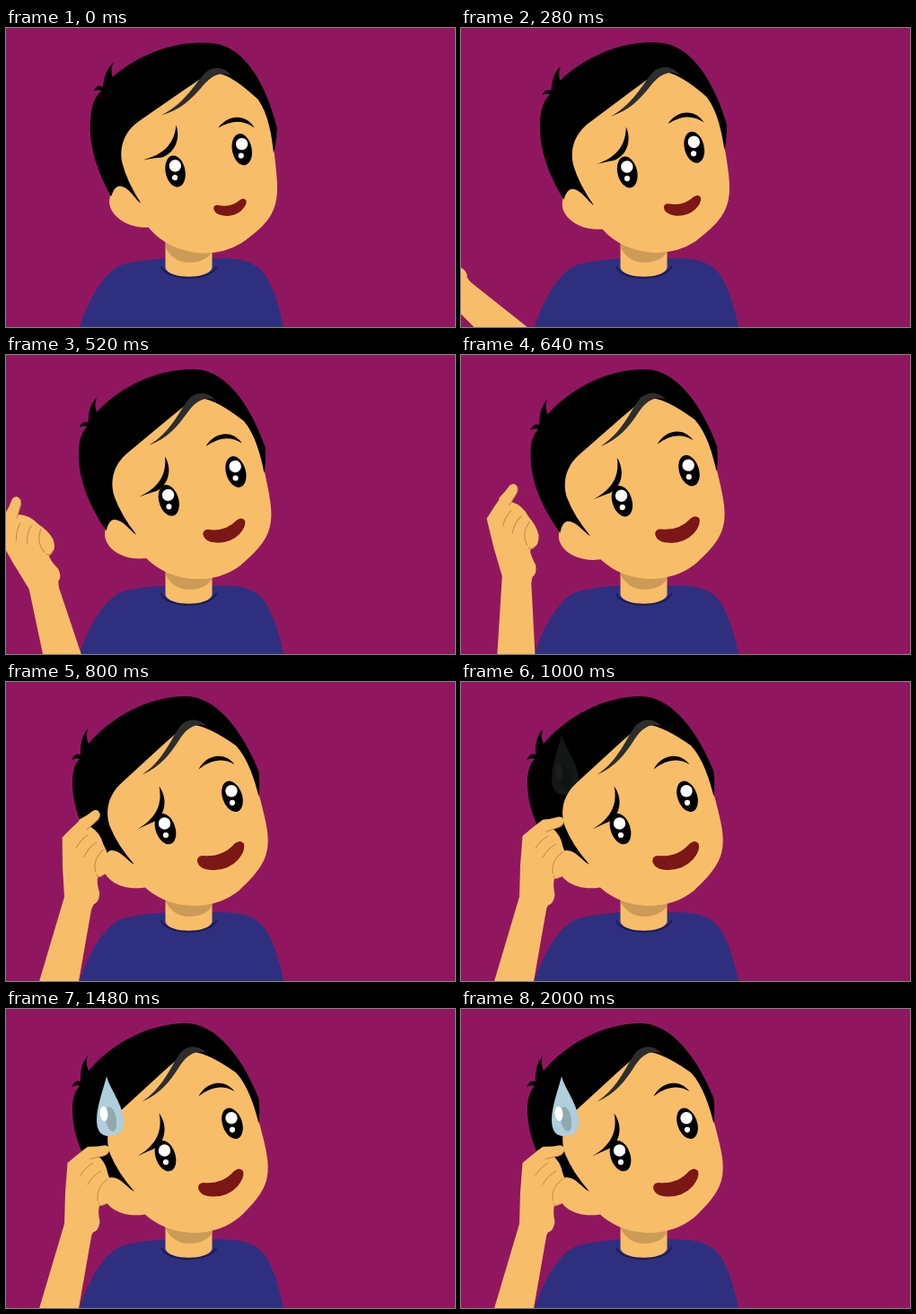
Animation, 500 px wide and 334 px high, one loop 2240 ms. Source, as an HTML page:

```html
<!DOCTYPE html>
<html lang="en">
<head>
<meta charset="utf-8">
<title>Puzzled boy</title>
<style>
  html, body { margin: 0; width: 100%; height: 100%; overflow: hidden; background: #90175f; }
  svg { display: block; width: 100vw; height: 100vh; }
  .skin { fill: #f8bd69; }
  .crease { fill: none; stroke: #b98a48; stroke-width: 1; stroke-linecap: round; }
  .lips { fill: #7b1716; }
</style>
</head>
<body>
<svg viewBox="0 0 500 334">
  <rect width="500" height="334" fill="#90175f"/>

  <!-- torso -->
  <path fill="#2f2f80" d="M82 334C91 304 112 267 133 263.500Q150 259 178 257.500H230C265 256 281 262 292 281Q303 303 309 334Z"/>
  <path fill="none" stroke="#1b1b55" stroke-width="2.200" d="M173 266.500C178 283 229 283 234.500 266"/>
  <path class="skin" d="M177.500 235H229.500V268C226 281 181 281 177.500 268Z"/>
  <path fill="#cc9b57" d="M178 238H229.500V250Q222 262 204 262Q187 262 178 246Z"/>

  <g id="head">
    <path class="skin" d="M281.500 125C288 150 293 168 291.500 182C290 203 276 217 260 232.500Q240 249 212 250C185 250 168 241 155 229.500C128 234 109 220 107.700 206Q107 189 117 187L100 140L130 80L205 30L262 66L278 100Z"/>
    <path d="M143 204C134 199 128 188 117 188Q111 189 109 201C95 182 74 150 74 112C74 98 78 90 82 86Q79 84 73.500 87Q76 79 83 81Q82 62 91 52.500Q88 61 92 69C118 38 160 16 200 16C235 16 264 56 281.500 100Q283 116 281.500 128C277 110 270 86 256 71Q225 49 208 48Q200 48 192 55L174.500 70.500L130 111.500C111 128 111 148 116 162Q124 182 143 204Z"/>
    <path fill="#2d2d2d" d="M151.500 103.500C172 95 183 80 192 66C200 53 209 45 223 49C214 40 204 41 196 47C186 57 178 86 151.500 103.500Z"/>
    <g id="leftEye">
      <ellipse rx="10.900" ry="17.800" transform="translate(177.500 164) rotate(-19)"/>
      <circle cx="176.500" cy="158" r="6.700" fill="#fff"/>
      <circle cx="178" cy="171" r="3.100" fill="#fff"/>
    </g>
    <g id="rightEye">
      <ellipse rx="10.900" ry="17.800" transform="translate(252 127.800) rotate(-19)"/>
      <circle cx="251" cy="121.800" r="6.700" fill="#fff"/>
      <circle cx="252" cy="134.800" r="3.100" fill="#fff"/>
    </g>
    <path id="leftBrow" d="M146.500 164.500C160 156 176 143 170.500 116.500C181 131 177 149 165 156Q157 159 146.500 164.500Z"/>
    <path id="rightBrow" d="M214.500 97.500C223 81 243 77 254.500 92C241 84.500 229 86.500 214.500 97.500Z"/>
    <path id="mouth" class="lips" d="M220 194Q241 196 254 181Q260 176 264 181Q266 188 258 198Q247 210 230 209.500Q216 209 214 200Q214 194 220 194Z"/>
  </g>

  <g id="arm">
    <path class="skin" d="M65 240L20 392L73 380L97 243Z"/>
    <g id="hand">
      <path class="skin" d="M65 240L66 205L68.500 172Q80 162 91 154L101 163Q111 170 113.500 184Q119 197 118 207Q115 218 109 218.500L104 220Q102 225 104.500 238Q103 248 97 249.500L92 258L64 250Z"/>
      <path class="crease" d="M83 185.500Q88 177 97 172M91 196Q96 186 106 181M102 214Q100 199 113 190M103 217Q105 222 110 218"/>
      <g id="finger">
        <path class="skin" d="M84 159L92 153.800Q101 154 110 152.300Q115.500 153 115 158Q114 163 107 164.500L95 167.500L84 170Z"/>
        <path class="crease" d="M94 167.500L107 164.500Q113 163.500 114.800 159"/>
      </g>
    </g>
  </g>

  <g id="drop">
    <path fill="#b0cedb" d="M112 75C115 88 131 108 131 125C131 137 125 142 115 142C105 142 101 135 101 124C101 108 109 88 112 75Z"/>
    <ellipse rx="6" ry="14" fill="#8fa9af" transform="translate(116.800 123) rotate(-10)"/>
    <ellipse rx="4.400" ry="8.300" fill="#fff" transform="translate(109 117) rotate(-6)"/>
  </g>
</svg>
<script>
  const LOOP = 2240, STEP = 40;
  const parts = {};
  document.querySelectorAll('g[id], path[id]').forEach(el => parts[el.id] = el);

  const progress = (t, from, to) => Math.min(1, Math.max(0, (t - from) / (to - from)));
  const mix = (a, b, k) => a + (b - a) * k;
  const move = (x, y) => `translate(${x} ${y})`;
  const turn = (angle, x, y) => `rotate(${angle} ${x} ${y})`;
  const pose = (id, ...transforms) => parts[id].setAttribute('transform', transforms.join(' '));

  // Arm keys: time, angle, x shift, y shift
  const armKeys = [[0, -99, -28, 12], [280, -61.4, -15, -2], [520, -28.4, 0, 0], [740, 0, 0, 0]];

  function armAt(t) {
    if (t >= 740) return [0, 0, 0];
    const i = armKeys.findIndex(key => key[0] > t);
    const a = armKeys[i - 1], b = armKeys[i], k = progress(t, a[0], b[0]);
    return [1, 2, 3].map(n => mix(a[n], b[n], k));
  }

  function draw(t) {
    const rest = 1 - progress(t, 80, 760);
    pose('head', turn(8 * rest, 205, 252));
    pose('leftEye', move(-1.6 * rest, -0.8 * rest));
    pose('rightEye', move(-6 * rest, rest));
    pose('leftBrow', move(-8 * rest, -8.5 * rest), turn(9 * rest, 148, 164));
    pose('rightBrow', move(2 * rest, 11 * rest));

    const smile = mix(1.04, 0.7, rest) - 0.04 * progress(t, 800, 1480);
    pose('mouth', move(240 + 2 * rest, 194), `scale(${smile})`, move(-240, -194));

    const [angle, x, y] = armAt(t);
    pose('arm', move(x, y), turn(angle, 87, 328.4));
    pose('hand', turn(-5 * (1 - progress(t, 800, 960)), 82, 240));

    // The fingertip scratches once the hand has arrived.
    const lift = t < 780 ? 1 : (1 - Math.cos(2 * Math.PI * (t - 2000) / 260)) / 2;
    pose('finger', turn(-27 * (t >= 2000 ? 0 : lift), 91, 160));

    const fall = progress(t, 960, 1320);
    pose('drop', move(0, -18 * (1 - fall)));
    parts.drop.setAttribute('opacity', fall);
  }

  const start = performance.now();
  function tick() {
    const t = (performance.now() - start) % LOOP;
    draw(Math.floor(t / STEP) * STEP);
    requestAnimationFrame(tick);
  }
  tick();
</script>
</body>
</html>
```
